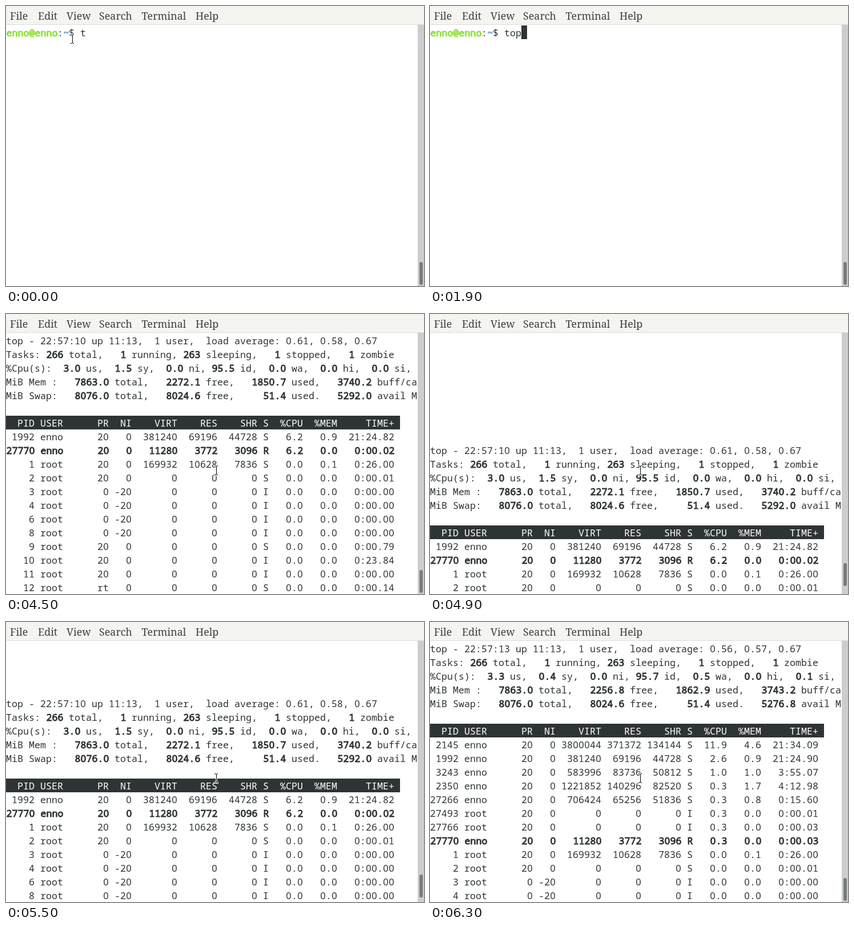
Write an HTML page with a canvas that moves like this. It is 732 px wide and 490 px high and loops after 8 s.

```html
<!DOCTYPE html>
<html lang="en">
<head>
<meta charset="utf-8">
<title>Terminal running top</title>
<style>
  html, body { margin: 0; width: 732px; height: 490px; overflow: hidden; background: #fff; }
  canvas { display: block; }
</style>
</head>
<body>
<canvas id="stage" width="732" height="490"></canvas>
<script>
const ctx = document.getElementById('stage').getContext('2d');
const LOOP = 8000, CELL = 10, LINE = 24, TOP = 34, HEADING = 6;
const INK = '#2e3436', GREEN = '#8ae234', BLUE = '#729fcf';
const MONO = '16.667px "Noto Sans Mono", monospace';
const PLAIN_ZERO = '16.667px "Noto Sans", sans-serif';
const USER = 'enno';

const MENU = [['File', 7], ['Edit', 56], ['View', 106], ['Search', 163], ['Terminal', 237.5], ['Help', 332]];

// Asterisks toggle bold.
const summary = (clock, load, cpu, mem, avail) => [
  `top - 22:57:${clock} up 11:13,  1 user,  load average: ${load}, 0.67`,
  'Tasks: *266* total,   *1* running, *263* sleeping,   *1* stopped,   *1* zombie',
  '%Cpu(s): ' + ['us', 'sy', 'ni', 'id', 'wa', 'hi', 'si']
    .map((name, i) => `*${cpu[i].padStart(4)}* ${name},`).join(' '),
  `MiB Mem :   *7863.0* total,   *${mem[0]}* free,   *${mem[1]}* used,   *${mem[2]}* buff/ca`,
  `MiB Swap:   *8076.0* total,   *8024.6* free,     *51.4* used.   *${avail}* avail M`,
  ''
];

const WIDTHS = [5, 0, 4, 4, 8, 7, 7, 2, 6, 6, 10];
function row(text) {
  const fields = text.split(' ');
  const line = fields.map((f, i) => i === 1 ? ' ' + f.padEnd(8) : f.padStart(WIDTHS[i])).join('');
  return fields[7] === 'R' ? `*${line}*` : line;
}
const kernel = (pid, pr, ni, state, time, cpu = '0.0') =>
  `${pid} root ${pr} ${ni} 0 0 0 ${state} ${cpu} 0.0 ${time}`;
const own = (pid, rest) => `${pid} ${USER} 20 0 ${rest}`;

const heading = 'PID USER PR NI VIRT RES SHR S %CPU %MEM TIME+';
const system = [
  '1 root 20 0 169932 10628 7836 S 0.0 0.1 0:26.00',
  kernel(2, 20, 0, 'S', '0:00.01'),
  ...[3, 4, 6, 8].map(pid => kernel(pid, 0, -20, 'I', '0:00.00')),
  kernel(9, 20, 0, 'S', '0:00.79'),
  kernel(10, 20, 0, 'I', '0:23.84'),
  kernel(11, 20, 0, 'I', '0:00.00'),
  kernel(12, 'rt', 0, 'S', '0:00.14')
];

const firstReport = [
  ...summary('10', '0.61, 0.58', ['3.0', '1.5', '0.0', '95.5', '0.0', '0.0', '0.0'],
    ['2272.1', '1850.7', '3740.2'], '5292.0'),
  ...[heading,
    own(1992, '381240 69196 44728 S 6.2 0.9 21:24.82'),
    own(27770, '11280 3772 3096 R 6.2 0.0 0:00.02'),
    ...system].map(row)
];
const secondReport = [
  ...summary('13', '0.56, 0.57', ['3.3', '0.4', '0.0', '95.7', '0.5', '0.0', '0.1'],
    ['2256.8', '1862.9', '3743.2'], '5276.8'),
  ...[heading,
    own(2145, '3800044 371372 134144 S 11.9 4.6 21:34.09'),
    own(1992, '381240 69196 44728 S 2.6 0.9 21:24.90'),
    own(3243, '583996 83736 50812 S 1.0 1.0 3:55.07'),
    own(2350, '1221852 140296 82520 S 0.3 1.7 4:12.98'),
    own(27266, '706424 65256 51836 S 0.3 0.8 0:15.60'),
    kernel(27493, 20, 0, 'I', '0:00.01', '0.3'),
    kernel(27766, 20, 0, 'I', '0:00.03', '0.3'),
    own(27770, '11280 3772 3096 R 0.3 0.0 0:00.03'),
    ...system.slice(0, 4)].map(row)
];

// Each track lists [start time, value]; a value holds until the next start.
const TYPED = [[0, 't'], [500, ''], [1500, 't'], [1600, 'to'], [1900, 'top']];
const CURSOR = [[0, ''], [300, 'prompt'], [900, ''], [1100, 'prompt'], [2400, ''], [3100, 'below'], [3300, '']];
const SCROLL = [[0, 0], [4700, 4], [4900, 8], [5200, 6], [5500, 4], [6100, 2], [6300, 0]];
const POINTER = [[0, [116, 57]], [300, null], [3900, [116, 57]], [4000, null],
  [4200, [369, 183]], [4300, [369, 218]], [4400, [368, 253]], [4500, [368, 273]]];
const at = (track, t) => track.findLast(([start]) => start <= t)[1];

function box(x, y, w, h, color) {
  ctx.fillStyle = color;
  ctx.fillRect(x, y, w, h);
}

// One glyph per cell; bold is the regular glyph thickened towards the right.
function write(text, col, line, color = INK, bold = false) {
  const y = TOP + line * LINE + 19;
  ctx.textAlign = 'center';
  ctx.fillStyle = ctx.strokeStyle = color;
  ctx.lineWidth = 0.9;
  [...text].forEach((glyph, i) => {
    const x = (col + i + 0.5) * CELL + (bold ? 0.5 : 0);
    ctx.font = glyph === '0' ? PLAIN_ZERO : MONO;
    ctx.fillText(glyph, x, y);
    if (bold) ctx.strokeText(glyph, x, y);
  });
}

function drawPrompt(t) {
  const typed = at(TYPED, t), cursor = at(CURSOR, t);
  write(`${USER}@${USER}`, 0, 0, GREEN, true);
  write(':', 9, 0);
  write('~', 10, 0, BLUE, true);
  write('$ ' + typed, 11, 0);
  if (cursor === 'prompt') box((13 + typed.length) * CELL, TOP, CELL, LINE, INK);
  if (cursor === 'below') box(0, TOP + LINE, CELL, LINE, INK);
}

function drawReport(report, offset) {
  report.forEach((text, i) => {
    const line = i + offset, inverse = i === HEADING;
    if (inverse) box(0, TOP + line * LINE, 690, LINE, INK);
    let col = 0;
    text.split('*').forEach((part, n) => {
      write(part, col, line, inverse ? '#fff' : INK, n % 2 === 1);
      col += part.length;
    });
  });
}

function drawChrome(scroll) {
  box(0, 0, 732, 32, '#f4f4f0');
  box(0, 32, 732, 1, '#dcdcd8');
  ctx.font = '17.9px "Noto Serif", serif';
  ctx.textAlign = 'left';
  ctx.fillStyle = '#3b3f40';
  for (const [label, x] of MENU) ctx.fillText(label, x, 24);
  box(721, 33, 11, 457, '#cdcdcd');
  ctx.fillStyle = '#777d7c';
  ctx.beginPath();
  ctx.roundRect(724, 448 - scroll * 1.5, 6, 40, 3);
  ctx.fill();
}

function drawPointer([x, y]) {
  const strokes = [[-3, -8, 2, 1], [1, -8, 2, 1], [-1, -7, 2, 1], [0, -7, 1, 15], [-3, 8, 2, 1], [1, 8, 2, 1], [-1, 7, 2, 1]];
  for (const [dx, dy, w, h] of strokes) box(x + dx - 1, y + dy - 1, w + 2, h + 2, '#fff');
  for (const [dx, dy, w, h] of strokes) box(x + dx, y + dy, w, h, '#000');
}

function frame(now) {
  const t = now % LOOP, scroll = at(SCROLL, t), pointer = at(POINTER, t);
  box(0, 0, 732, 490, '#fff');
  ctx.save();
  ctx.beginPath();
  ctx.rect(0, 33, 720, 457);
  ctx.clip();
  if (t < 3500) drawPrompt(t);
  else drawReport(t < 6300 ? firstReport : secondReport, scroll);
  ctx.restore();
  drawChrome(scroll);
  if (pointer) drawPointer(pointer);
}

const begin = performance.now();
(function tick() {
  frame(performance.now() - begin);
  requestAnimationFrame(tick);
})();
</script>
</body>
</html>
```
